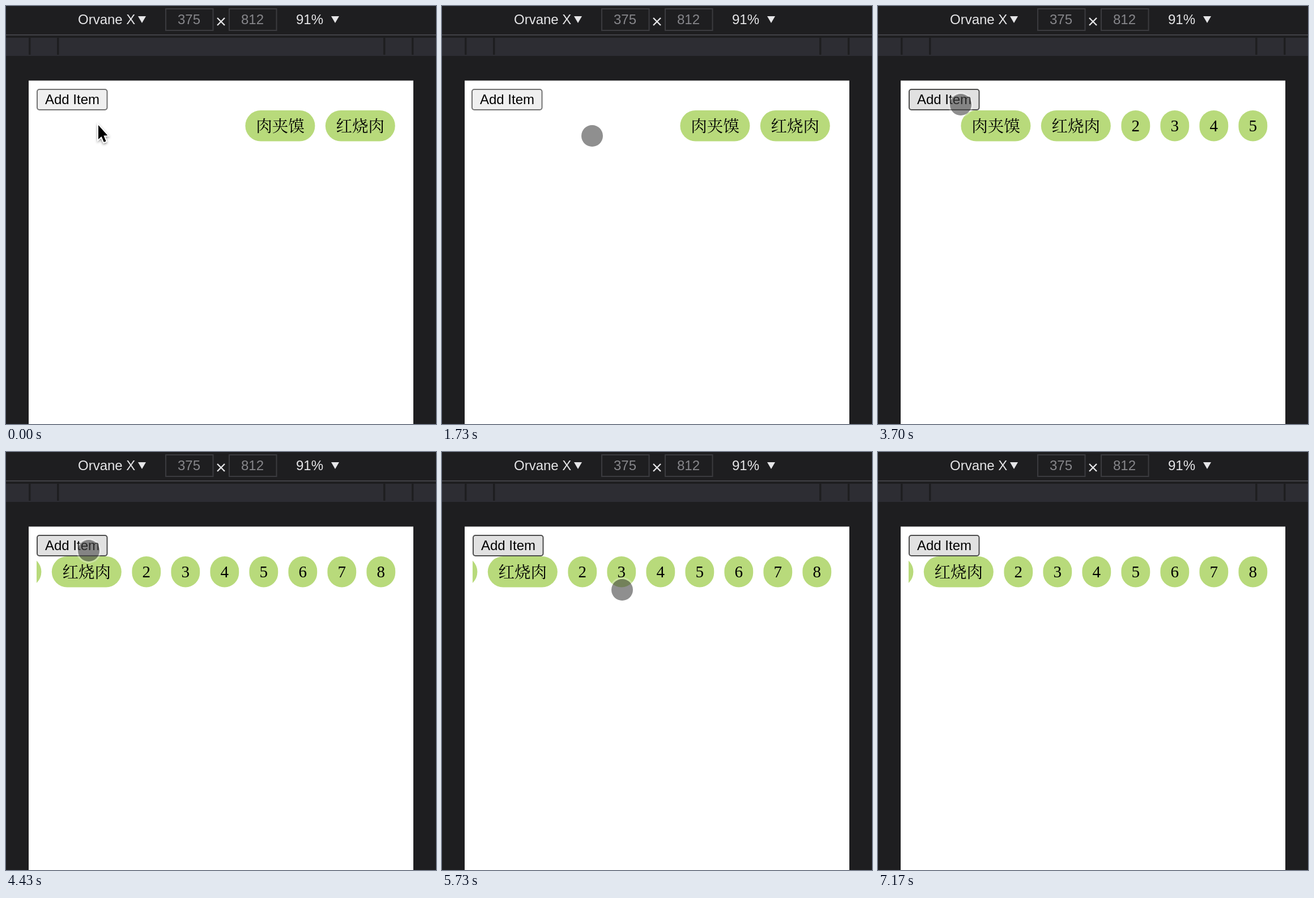
An HTML page with a canvas for the animation above (7230 ms loop, 759 by 737 pixels).

```html
<!DOCTYPE html>
<html lang="zh-CN">
<head>
<meta charset="utf-8">
<title>Add Item</title>
<style>
  html, body { margin: 0; width: 100%; height: 100%; overflow: hidden; background: #1e1e20; }
  canvas { display: block; }
</style>
</head>
<body>
<canvas id="stage" width="759" height="737"></canvas>
<script>
const ctx = document.getElementById('stage').getContext('2d');
const LOOP = 7230;
const SANS = '24px "Liberation Sans", Arial, sans-serif';
const DIGIT = '29px "Liberation Serif", Times, serif';
const HANZI = '28.5px "Noto Serif CJK SC", "Noto Sans CJK SC", serif';
const PITCH = 69, LAST_X = 636.5;

const addTimes = [2380, 2640, 2920, 3220, 3720, 3990, 4210];

// Each track is a list of [time, value, ...]
const dotPath = [
  [700, 168, 214], [1000, 232, 224], [1400, 300, 228], [1730, 265, 229],
  [1930, 220, 222], [2140, 146, 174], [4480, 146, 174], [4750, 240, 229],
  [5070, 214, 231], [5350, 318, 238], [5560, 230, 242], [5730, 318, 243],
  [5870, 350, 244], [6530, 711, 474]
];
const pageShift = [[1430, 0], [1530, -2], [1900, -2], [2000, 0], [4850, 0], [4950, -2], [5100, -2], [5160, 0]];
const listDrag = [[5130, 0], [5350, 100], [5600, 0]];

const clamp = v => Math.max(0, Math.min(1, v));
const smooth = v => v * v * (3 - 2 * v);
const easeOut = v => 1 - (1 - clamp(v)) ** 3;

function sample(track, t) {
  if (t <= track[0][0]) return track[0].slice(1);
  const i = track.findIndex(k => k[0] > t);
  if (i < 0) return track.at(-1).slice(1);
  const a = track[i - 1], b = track[i];
  const p = smooth((t - a[0]) / (b[0] - a[0]));
  return a.slice(1).map((v, j) => v + (b[j + 1] - v) * p);
}

function rect(x, y, w, h, color) {
  ctx.fillStyle = color;
  ctx.fillRect(x, y, w, h);
}

function text(str, x, y, color, font = SANS, align = 'left') {
  ctx.font = font;
  ctx.textAlign = align;
  ctx.fillStyle = color;
  ctx.fillText(str, x, y);
}

function polygon(points, color) {
  ctx.beginPath();
  points.forEach(([x, y]) => ctx.lineTo(x, y));
  ctx.closePath();
  ctx.fillStyle = color;
  ctx.fill();
}

function circle(x, y, r, color) {
  ctx.beginPath();
  ctx.arc(x, y, r, 0, 7);
  ctx.fillStyle = color;
  ctx.fill();
}

function toolbar() {
  rect(0, 0, 759, 737, '#1e1e20');
  rect(0, 50, 759, 2, '#414246');
  rect(0, 56, 759, 32, '#2d2d33');
  for (const x of [40, 90, 666, 716]) rect(x, 56, 3.5, 30, '#1e1e20');

  text('Orvane X', 127, 32, '#e6e6e8');
  text('91%', 512, 32, '#e6e6e8');
  for (const x of [233, 574]) polygon([[x, 18], [x + 14, 18], [x + 7, 30]], '#e6e6e8');

  ctx.lineWidth = 2;
  ctx.strokeStyle = '#3b3b3f';
  for (const [x, label] of [[281, '375'], [393, '812']]) {
    ctx.strokeRect(x + 1, 5, 83.5, 38);
    text(label, x + 42, 32, '#86868a', SANS, 'center');
  }
  ctx.lineWidth = 2.4;
  ctx.strokeStyle = '#e6e6e8';
  ctx.beginPath();
  ctx.moveTo(373, 21); ctx.lineTo(386, 34);
  ctx.moveTo(386, 21); ctx.lineTo(373, 34);
  ctx.stroke();
}

function button(hover) {
  ctx.beginPath();
  ctx.roundRect(55, 147, 123.5, 36, 4);
  ctx.fillStyle = hover ? '#e1e1e1' : '#efefef';
  ctx.fill();
  ctx.lineWidth = 2;
  ctx.strokeStyle = hover ? '#4d4d4d' : '#737373';
  ctx.stroke();
  text('Add Item', 69, 173, '#000');
}

function chip(x, w, label, font, base, alpha = 1) {
  ctx.globalAlpha = alpha;
  ctx.beginPath();
  ctx.roundRect(x, 184, w, 54.5, Math.min(27.2, w / 2));
  ctx.fillStyle = '#b8da7b';
  ctx.fill();
  text(label, x + w / 2, base, '#000', font, 'center');
  ctx.globalAlpha = 1;
}

function list(t) {
  const shown = addTimes.map(at => easeOut((t - at) / 180));
  const drag = sample(listDrag, t)[0];
  const left = 422.4 + drag - PITCH * shown.reduce((a, b) => a + b, 0);
  ctx.save();
  ctx.beginPath();
  ctx.rect(54, 184, 651, 56);
  ctx.clip();
  chip(left, 123, '肉夹馍', HANZI, 222);
  chip(left + 141.4, 123, '红烧肉', HANZI, 222);
  shown.forEach((alpha, i) => {
    if (alpha) {
      const x = Math.min(left + 283 + PITCH * i, LAST_X + drag);
      chip(x, 50.8, String(i + 2), DIGIT, 220.5, alpha);
    }
  });
  ctx.restore();
}

function arrow() {
  const shape = [[163, 210], [163, 235], [168.5, 230], [172.8, 240], [176.5, 238.4], [172.4, 228.6], [179.3, 228.2]];
  ctx.save();
  ctx.shadowColor = 'rgba(0,0,0,.35)';
  ctx.shadowBlur = 4;
  ctx.shadowOffsetY = 2;
  polygon(shape, '#fff');
  ctx.lineWidth = 4;
  ctx.strokeStyle = '#fff';
  ctx.stroke();
  ctx.restore();
  polygon(shape, '#000');
}

function pointer(t) {
  if (t < 700) return arrow();
  if (t >= 6600) return;
  const [x, y] = sample(dotPath, t);
  circle(x, y, 22, 'rgba(255,255,255,.28)');
  circle(x, y, 19, 'rgba(0,0,0,.44)');
}

function draw(now) {
  const t = now % LOOP;
  toolbar();
  rect(40, 131.5, 679, 606, '#fff');
  ctx.save();
  ctx.translate(sample(pageShift, t)[0], 0);
  button(t >= 2150);
  list(t);
  ctx.restore();
  pointer(t);
  requestAnimationFrame(draw);
}
requestAnimationFrame(draw);
</script>
</body>
</html>
```
